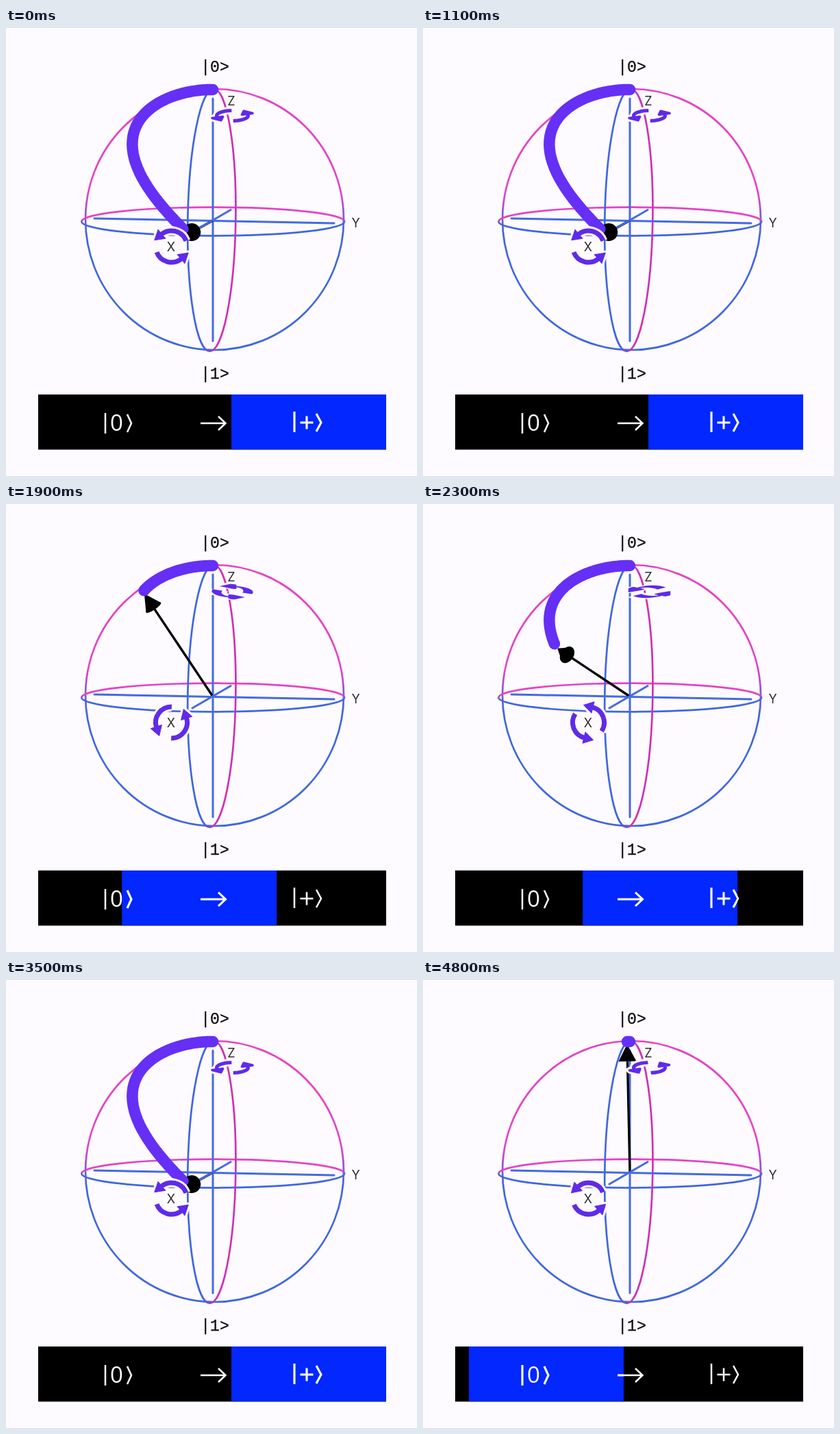
Recreate the animation shown at these times as an HTML page. Size 600 by 654 pixels, loop 4.9 s.

```html
<!DOCTYPE html>
<html lang="en">
<head>
<meta charset="utf-8">
<title>Qubit rotation</title>
<style>
  html, body { margin: 0; width: 100%; height: 100%; overflow: hidden; background: #fdfbff; }
  svg { display: block; width: 600px; height: 654px; }
  .line { fill: none; stroke-width: 2.7; }
  .axis { stroke: #456ae2; stroke-width: 3; stroke-linecap: round; }
  .ket { font: 23px "Liberation Mono", monospace; fill: #111; stroke: #111; stroke-width: .35; text-anchor: middle; }
  .name { font: 18px Inter, sans-serif; fill: #2b2b2b; text-anchor: middle; }
  .digit { font: 500 33px "Open Sans", sans-serif; text-anchor: middle; stroke: none; }
  .halo { fill: #fdfbff; stroke: #fdfbff; --rim: 6px; }
  .ink { fill: #5f2be8; stroke: #5f2be8; --rim: 0px; }
  .front { --band: 7px; --edge: 1px; }
  .tilted { --band: 5px; --edge: 3.5px; }
  #arc, #head { vector-effect: non-scaling-stroke; stroke-linejoin: round; }
  #arc { fill: none; stroke-width: calc(var(--band) + var(--rim)); }
  #head { stroke-width: calc(var(--edge) + var(--rim)); }
</style>
</head>
<body>
<svg viewBox="0 0 600 654">
  <defs>
    <linearGradient id="down" x1="0" y1="0" x2="0" y2="1">
      <stop offset=".4" stop-color="#e542c4"/>
      <stop offset=".56" stop-color="#3f66e2"/>
    </linearGradient>
    <linearGradient id="across">
      <stop offset=".35" stop-color="#3f66e2"/>
      <stop offset=".65" stop-color="#d030b2"/>
    </linearGradient>
    <clipPath id="window"><rect id="hole" y="535" width="226" height="80.5"/></clipPath>
    <!-- Two curved arrows, centred on the origin -->
    <g id="arrow">
      <path id="arc"/>
      <path id="head" d="M14.5 1H31.5L23 -13Z"/>
    </g>
    <g id="pair"><use href="#arrow"/><use href="#arrow" transform="rotate(180)"/></g>
    <g id="spinner"><use href="#pair" class="halo"/><use href="#pair" class="ink"/></g>
    <g id="states" fill="none" stroke="#fff">
      <path d="M145 562V592M177 564L183 577L177 590M421 560V590M429.5 576H448.5M439 566.5V585.5M453 563L460 576L453 589"/>
      <path d="M284 577H320M310 567L320.5 577L310 587"/>
      <text class="digit" x="161.5" y="588" fill="#fff">0</text>
    </g>
  </defs>

  <ellipse class="line" cx="304.5" cy="279.5" rx="188.5" ry="190.5" stroke="url(#down)"/>
  <ellipse class="line" cx="302.2" cy="282.5" rx="192" ry="20.8" stroke="url(#down)"/>
  <ellipse class="line" cx="300.3" cy="280.5" rx="35" ry="191.5" stroke="url(#across)" transform="rotate(.9 300.3 280.5)"/>
  <path class="axis" d="M302 103V457M129 278L479 285"/>
  <line id="shaft" x1="302" y1="281" stroke="#000" stroke-width="3.4"/>
  <path class="axis" d="M272 298L328 265.5"/>
  <g id="cone">
    <path id="side"/>
    <ellipse id="base"/>
  </g>
  <path id="trail" fill="none" stroke="#652ff6" stroke-width="16.5" stroke-linecap="round" stroke-linejoin="round"/>

  <g class="front" transform="translate(241.5 319)"><use id="spinX" href="#spinner"/></g>
  <g class="tilted" transform="translate(330.5 128) scale(1 .33)"><use id="spinZ" href="#spinner"/></g>

  <text class="ket" x="305" y="64">|0&gt;</text>
  <text class="ket" x="305" y="512">|1&gt;</text>
  <text class="name" x="241" y="325.5">X</text>
  <text class="name" x="510.5" y="291">Y</text>
  <text class="name" x="329" y="112.5">Z</text>

  <rect x="47" y="535" width="508" height="80.5"/>
  <use href="#states" stroke-width="2.5"/>
  <g clip-path="url(#window)">
    <rect x="47" y="535" width="508" height="80.5" fill="#0227ff"/>
    <use href="#states" stroke-width="3.1"/>
  </g>
</svg>
<script>
  const LOOP = 4900, STEP = 100;
  const STARTS = [1135, 4675];
  const RUN = 1765, TURN = 1830;
  const CENTER = [302, 281], RADIUS = 191;

  const $ = id => document.getElementById(id);
  const set = (id, attrs) => {
    for (const key in attrs) $(id).setAttribute(key, attrs[key]);
  };
  const clamp = v => Math.min(1, Math.max(0, v));
  const smooth = v => v * v * (3 - 2 * v);
  const fix = v => v.toFixed(2);

  // Screen position of the state, from the pole (0) to the front of the equator (1)
  function spot(p, scale = 1) {
    const s = Math.sin(p * Math.PI / 2), c = Math.cos(p * Math.PI / 2);
    return [
      CENTER[0] + scale * (-196 * s * c - 36 * s * s),
      CENTER[1] + scale * (-RADIUS * c - 2 * s * c + 20 * s * s)
    ];
  }

  function drawTrail(end) {
    let d = "";
    for (let i = 0; i <= 40; i++) d += (i ? "L" : "M") + spot(end * i / 40).map(fix);
    set("trail", { d });
  }

  function drawVector(p) {
    const [x, y] = spot(p, 0.98);
    const dx = x - CENTER[0], dy = y - CENTER[1];
    const size = Math.hypot(dx, dy);
    const flat = Math.min(1, size / (RADIUS * 0.98));
    const length = 25 * flat;
    const depth = 13 * Math.sqrt(1 - flat * flat);
    const angle = Math.atan2(dy, dx) * 180 / Math.PI;
    set("shaft", { x2: x - dx / size * length, y2: y - dy / size * length });
    set("cone", { transform: `translate(${x} ${y}) rotate(${angle})` });
    set("side", { d: `M0 0L${-length} -13V13Z` });
    set("base", { cx: -length, rx: depth, ry: 13 });
  }

  function buildArc(r, degrees) {
    const a = degrees * Math.PI / 180;
    set("arc", { d: `M${r} 0A${r} ${r} 0 0 1 ${r * Math.cos(a)} ${r * Math.sin(a)}` });
  }

  function draw(time) {
    const t = Math.floor(time % LOOP / STEP) * STEP;
    const start = STARTS.filter(s => s <= t).pop();
    const age = start === undefined ? TURN : t - start;
    const p = smooth(clamp(age / TURN));

    drawTrail(p * 0.975);
    drawVector(p);
    set("spinX", { transform: `rotate(${230 - 180 * p})` });
    set("spinZ", { transform: `rotate(${158 - 180 * p})` });
    set("hole", { x: 47 + 282 * clamp(age / RUN) });
  }

  buildArc(23, 109);
  const begin = performance.now();
  (function tick() {
    draw(performance.now() - begin);
    requestAnimationFrame(tick);
  })();
</script>
</body>
</html>
```
